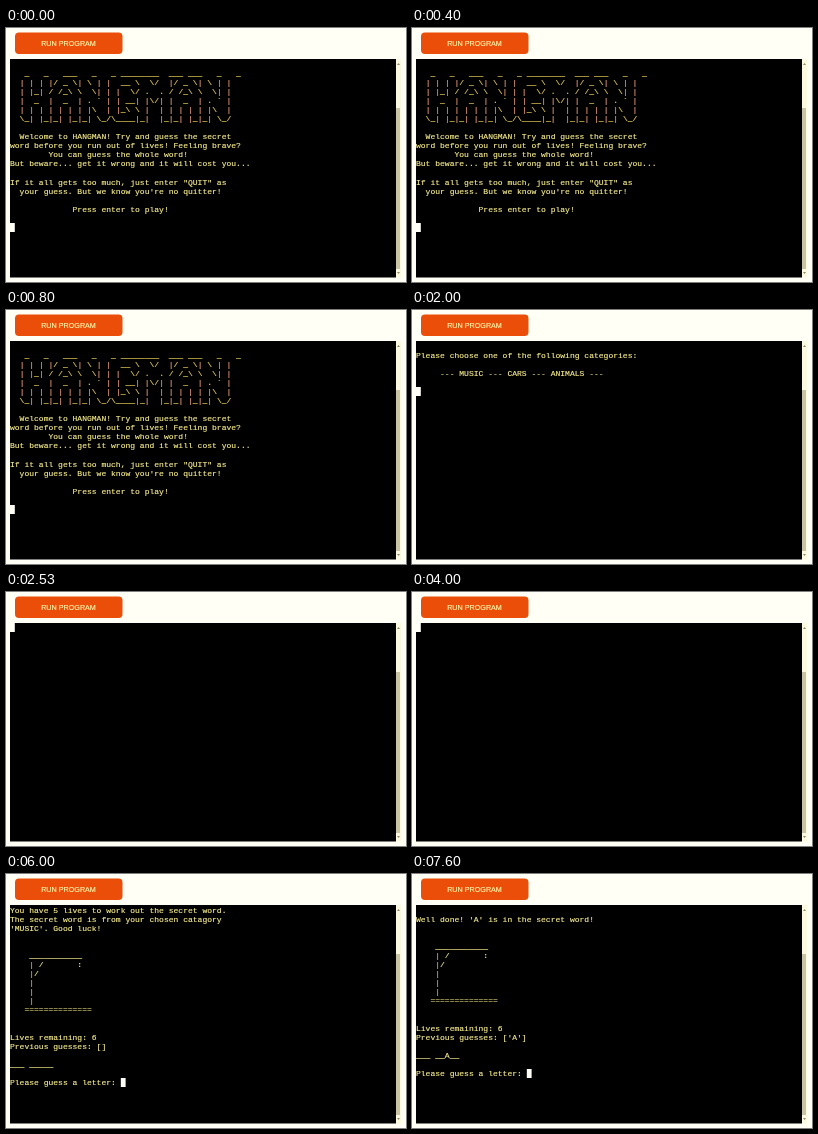
Recreate the animation shown at these times as an HTML page. Size 400 px wide and 254 px high, loop 8 s.

```html
<!DOCTYPE html>
<html lang="en">
<head>
<meta charset="utf-8">
<title>Hangman terminal</title>
<style>
  html, body { margin: 0; width: 100%; height: 100%; overflow: hidden; background: #fffff6; }
  svg { display: block; width: 100%; height: 100%; }
  #lines text {
    font: 8.03px "Liberation Mono", monospace;
    fill: #fbf08e; stroke: #fbf08e; stroke-width: .15px; white-space: pre;
  }
  #lines .art { fill: #f0d45c; stroke: #f0d45c; }
  #lines .bar { fill: #eda274; stroke: #eda274; }
  .label {
    font: 7.2px "Liberation Sans", sans-serif; text-anchor: middle;
    fill: #fff3a8; stroke: #fff3a8; stroke-width: .2px;
  }
</style>
</head>
<body>
<svg viewBox="0 0 400 254">
  <rect width="400" height="254" fill="#fffff6"/>
  <rect x="9" y="4.5" width="107.5" height="21.5" rx="4" fill="#ea4e08"/>
  <text class="label" x="62.5" y="17.8">RUN PROGRAM</text>
  <rect x="4" y="31" width="386" height="218.5"/>
  <rect x="390" y="31" width="5" height="218.5" fill="#fbfae0"/>
  <rect x="390" y="80" width="4" height="161" fill="#c9c4a4"/>
  <path d="M391 37l1.5-2 1.5 2zM391 244l1.5 2 1.5-2z" fill="#8f8a68"/>
  <g id="lines"></g>
  <rect id="cursor" width="4.8" height="9" fill="#fffff6"/>
</svg>
<script>
const LOOP = 8000, LEFT = 4, TOP = 31, COL = 4.818, ROW = 9.083;
const NS = "http://www.w3.org/2000/svg";
const linesEl = document.getElementById("lines");
const cursorEl = document.getElementById("cursor");

const title = String.raw`
   _   _   ___   _   _ ________  ___ ___   _   _
  | | | |/ _ \| \ | |  __ \  \/  |/ _ \| \ | |
  | |_| / /_\ \  \| | |  \/ .  . / /_\ \  \| |
  |  _  |  _  | . ' | | __| |\/| |  _  | . ' |
  | | | | | | | |\  | |_\ \ |  | | | | | |\  |
  \_| |_|_| |_|_| \_/\____|_|  |_|_| |_|_| \_/`
  .replaceAll("'", "`").split("\n");

const gallows = [
  "    " + "_".repeat(11),
  "    | /       :",
  "    |/",
  "    |",
  "    |",
  "    |",
  "   " + "=".repeat(14)
];

const round = (head, guesses, word) => [
  ...head, "", "", ...gallows, "", "",
  "Lives remaining: 6",
  `Previous guesses: [${guesses}]`,
  "", word, "",
  "Please guess a letter: "
];

const intro = [
  ...title, "",
  "  Welcome to HANGMAN! Try and guess the secret",
  "word before you run out of lives! Feeling brave?",
  "        You can guess the whole word!",
  "But beware... get it wrong and it will cost you...",
  "",
  "If it all gets too much, just enter \"QUIT\" as",
  "  your guess. But we know you're no quitter!",
  "",
  "             Press enter to play!",
  "", ""
];

const categories = [
  "",
  "Please choose one of the following categories:",
  "",
  "     --- MUSIC --- CARS --- ANIMALS ---",
  "", ""
];

const firstRound = round([
  "You have 5 lives to work out the secret word.",
  "The secret word is from your chosen catagory",
  "'MUSIC'. Good luck!"
], "", "___ _____");

const secondRound = round(["", "Well done! 'A' is in the secret word!"], "'A'", "___ __A__");

// The cursor waits at the end of each screen's last line.
const screens = [
  { at: 0, lines: intro, art: title.length },
  { at: 2000, lines: categories },
  { at: 2470, lines: [""] },
  { at: 4200, lines: firstRound },
  { at: 7470, lines: secondRound }
];

function drawLine(line, row, art) {
  const text = document.createElementNS(NS, "text");
  text.setAttribute("x", LEFT);
  text.setAttribute("y", TOP + row * ROW + 7.5);
  if (art) text.setAttribute("class", "art");
  for (const part of line.split(/(\|)/)) {
    const span = document.createElementNS(NS, "tspan");
    span.textContent = part;
    if (part === "|") span.setAttribute("class", "bar");
    text.append(span);
  }
  return text;
}

let shown;
function render(t) {
  const screen = screens.findLast(s => s.at <= t);
  if (screen === shown) return;
  shown = screen;
  const { lines, art = 0 } = screen;
  const last = lines.length - 1;
  linesEl.replaceChildren(...lines.map((line, row) => drawLine(line, row, row < art)));
  cursorEl.setAttribute("x", LEFT + lines[last].length * COL);
  cursorEl.setAttribute("y", Math.round(TOP + last * ROW + 0.3));
}

const start = performance.now();
function tick() {
  render((performance.now() - start) % LOOP);
  requestAnimationFrame(tick);
}
tick();
</script>
</body>
</html>
```
